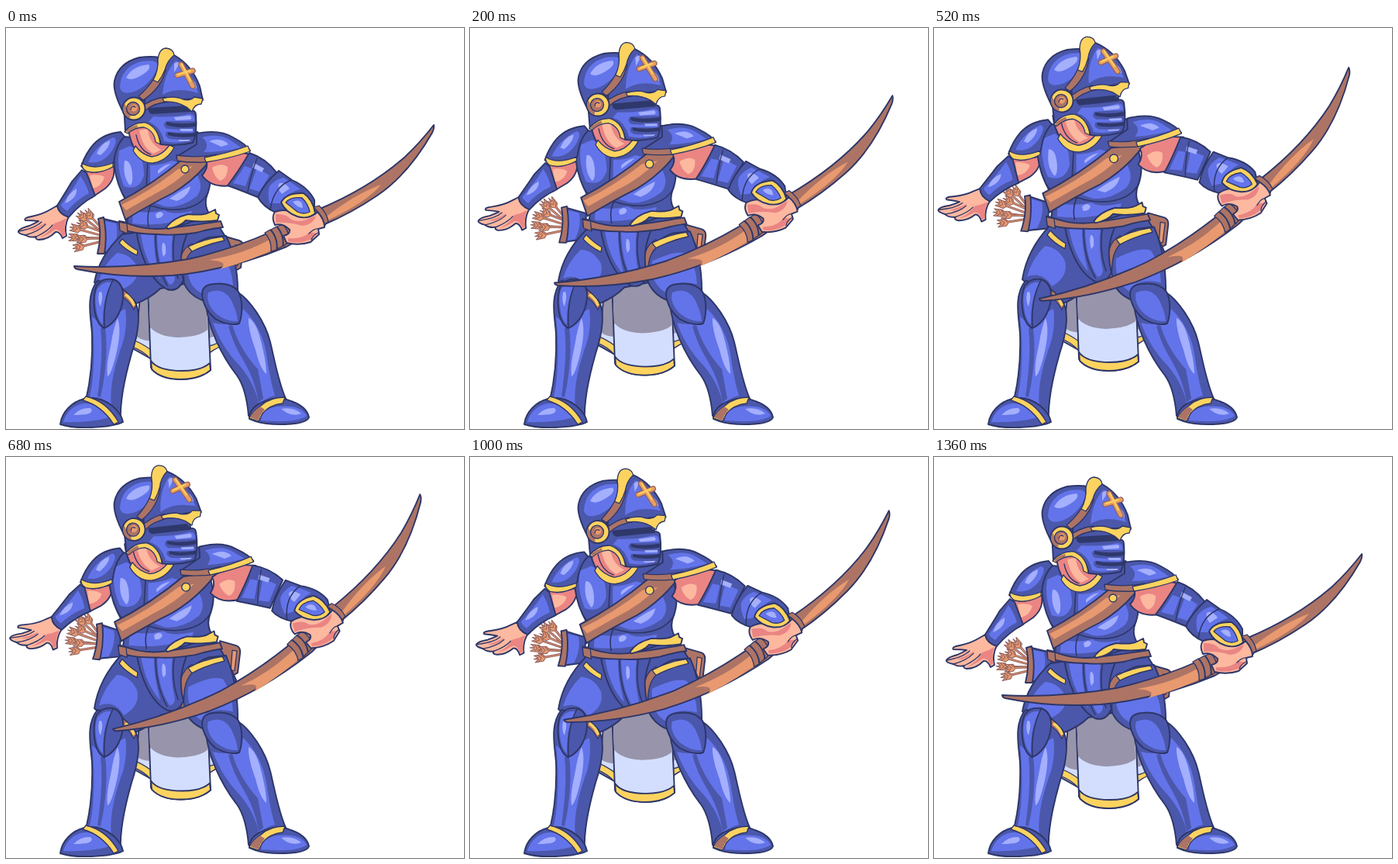
Write an HTML page that moves like this. It is 591x517 px and loops after 1400 ms.

```html
<!DOCTYPE html>
<html lang="en">
<head>
<meta charset="utf-8">
<title>Knight with bow</title>
<style>
  html, body { margin: 0; width: 100%; height: 100%; overflow: hidden; background: #fff }
  svg { display: block; width: 591px; height: 517px }
  path, circle { stroke-linejoin: round; stroke-linecap: round }
  .o { stroke: #2d3667; stroke-width: 1.9 }
  .d { fill: #4b57aa }
  .b { fill: #6374ea }
  .h { fill: #a4affd }
  .k { fill: #2f386b }
  .g { fill: #fdd35f }
  .n { fill: #ad7465 }
  .c { fill: #e8996f }
  .s { fill: #fdb8a0 }
  .p { fill: #ea8583 }
  .w { fill: #d3deff }
  .a { fill: #9794ab }
  .l { fill: none; stroke: #2d3667; stroke-width: 1.5 }
  .thin { stroke-width: 1.3 }
</style>
</head>
<body>
<svg viewBox="0 0 591 517">
  <g data-part="cloth">
    <path class="a o" d="M174 335L168 400Q166 407 163 413L188 427V340Z"/>
    <path class="w" d="M169 398Q177 404 187 403V417L167 407Z"/>
    <path class="g o thin" d="M166 403Q176 407 187 415V427Q177 416 163 411Z"/>
    <path class="a o" d="M258 340L274 398L278 408L262 419Z"/>
    <path class="w" d="M262 400L272 396L275 405L262 411Z"/>
    <path class="g o thin" d="M262 410Q271 408 276 404L278 410Q269 414 262 419Z"/>
    <path class="w o" d="M183 330L187 438Q200 453 226 453Q250 453 264 441L259 330Z"/>
    <path class="a" d="M184 330L186 386Q197 398 222 399Q250 398 260 389L258 330Z"/>
    <path class="g o" d="M187 429Q196 442 227 442Q252 442 263 432L264 441Q250 453 226 453Q200 453 188 440Z"/>
  </g>

  <g data-part="pouch">
    <path class="n o" d="M280 268L301 274Q307 276 306 284L303 309L296 313L284 309Z"/>
    <path class="c o thin" d="M296 280L302 281L299 306L294 307Z"/>
  </g>

  <g data-part="quiver">
    <g id="arrows"></g>
    <path class="d o" d="M126 246L151 252L152 285L125 290Z"/>
    <path class="b" d="M128 249L142 252Q146 270 138 286L128 288Z"/>
    <path class="n o" d="M119 246L126 244Q131 268 127 291L118 291Q124 268 119 246Z"/>
  </g>

  <g data-part="hips">
    <path class="d o" d="M155 245L270 248L285 272L298 300L150 300Z"/>
  </g>

  <g data-part="thighs">
    <path class="d o" d="M150 266C135 280 119 300 114 328L140 350L166 356Q187 348 199 336L230 330L195 260Z"/>
    <path class="b" d="M143 290Q126 305 120 325Q140 318 152 336Q174 325 169 307Q160 291 143 290Z"/>
    <path class="g o thin" d="M150 272Q160 282 170 287L169 293Q154 286 146 277Z"/>
    <path class="d o" d="M228 325C226 300 230 280 262 270L284 268C292 285 300 310 299 345L256 352Q235 345 228 325Z"/>
    <path class="b" d="M235 304Q266 290 280 295Q292 310 293 332Q270 327 258 335L254 343Q232 332 235 304Z"/>
    <path class="n o thin" d="M226 328C220 302 226 284 240 278L245 284C232 292 228 306 230 329Z"/>
    <path class="g o thin" d="M235 282Q255 272 279 269L282 274Q258 279 240 288Z"/>
  </g>

  <g data-part="hips">
    <path class="d o" d="M168 260C172 290 185 325 208 337Q222 341 229 325C222 300 227 280 236 260Z"/>
    <path class="b" d="M174 266Q179 302 199 324Q190 292 191 266Z"/>
    <path class="b" d="M195 266Q195 306 211 331Q217 330 218 323Q211 295 215 266Z"/>
    <path class="h" d="M202 277Q207 276 206 291L203 295Q200 287 202 277Z"/>
    <path class="l" d="M193 264Q192 304 208 332M218 264Q212 295 222 323"/>
  </g>

  <g id="legs">
    <path class="d o" d="M118 326C102 345 110 375 111 395C112 425 109 455 103 480L148 506C147 485 152 455 162 420C172 390 174 365 166 352L146 332Z"/>
    <path class="b" d="M111 372C115 410 114 450 108 476Q124 474 136 489C133 462 141 432 151 405Q157 383 154 362L143 368L128 386Z"/>
    <path class="d" d="M122 387Q126 420 118 475L122 476Q133 425 128 387Z"/>
    <path class="h" d="M144 374Q150 390 141 425Q135 448 131 449Q129 435 135 410Q139 385 144 374Z"/>
    <path class="n o thin" d="M148 336Q162 343 168 358L165 363Q158 350 149 346Z"/>
    <path class="g" d="M155 342Q164 348 167 357L164 359Q160 349 153 345Z"/>
    <path class="d o" d="M117 332Q125 322 138 324Q149 327 151 341C152 360 143 380 127 387Q117 383 114 362Q112 343 117 332Z"/>
    <path class="b" d="M118 336Q126 326 136 328Q124 350 125 382Q118 377 116 360Q114 345 118 336Z"/>
    <path class="h" d="M120 341Q125 337 124 350L122 359Q118 353 120 341Z"/>
    <path class="l" d="M138 325Q125 350 127 386"/>
    <path class="d o" d="M70 511C72 495 85 482 101 478Q120 474 137 487Q149 497 151 508Q140 514 110 515Q85 516 70 511Z"/>
    <path class="b" d="M74 508C77 495 90 484 103 484Q122 485 134 502Q110 509 74 508Z"/>
    <path class="h" d="M87 499Q96 489 109 490Q114 495 104 498Q95 499 87 499Z"/>
    <path class="g o thin" d="M103 475Q130 481 145 508L139 511Q124 487 99 480Z"/>

    <path class="d o" d="M257 345C258 385 280 425 298 448Q310 465 313 500L362 480C352 460 346 425 341 405C335 380 315 350 298 340Z"/>
    <path class="b" d="M267 380Q300 388 306 362Q330 385 336 420Q341 455 347 474Q335 477 326 485Q322 460 302 436Q278 411 267 380Z"/>
    <path class="d" d="M292 383Q302 415 325 440L332 478L326 483Q322 455 306 428Q292 405 287 384Z"/>
    <path class="h" d="M313 374Q322 378 328 400Q336 430 336 446Q328 440 322 415Q312 388 313 374Z"/>
    <path class="d o" d="M253 345Q252 331 268 330Q290 327 300 340C306 352 305 370 301 381Q288 385 270 375Q255 362 253 345Z"/>
    <path class="b" d="M261 341Q280 333 290 350Q298 365 299 378Q285 379 272 369Q257 355 261 341Z"/>
    <path class="d o" d="M314 499Q318 487 332 482Q352 474 368 481Q388 488 391 502Q388 510 360 511Q330 512 314 504Z"/>
    <path class="b" d="M329 506Q330 491 350 488Q380 485 388 500Q375 510 329 506Z"/>
    <path class="h" d="M355 491Q370 488 381 497Q372 501 362 496Z"/>
    <path class="g o thin" d="M329 487Q340 476 360 476L357 484Q340 486 331 497L326 507L314 503Q318 494 329 487Z"/>
    <path class="n" d="M328 488L334 492Q328 498 326 506L315 502Q319 494 328 488Z"/>
  </g>

  <g data-part="armL">
    <path class="p o" d="M104 178Q120 188 139 178Q142 195 128 207L110 219L98 195Z"/>
    <path class="s" d="M108 190Q120 188 127 192Q124 204 112 207Z"/>
    <path class="s o" d="M66 229L81 243Q75 255 78 268L73 271Q69 262 64 263Q54 273 42 273Q37 272 39 269Q31 271 25 267Q15 265 16 262Q18 258 30 255Q37 252 42 249Q34 248 25 248Q22 245 33 243Q48 240 59 233Z"/>
    <path class="p" d="M78 245Q74 256 77 266L73 269Q70 259 63 260Q52 268 44 270Q58 262 62 252Q70 250 78 245ZM30 261Q42 257 52 250Q46 258 36 261Z"/>
    <path class="l thin" d="M25 267Q43 262 51 253M39 269Q54 262 60 254M17 262Q38 258 46 250"/>
    <path class="d o" d="M98 183L104 187L115 216Q95 227 81 244Q68 240 66 229Q78 210 85 198Z"/>
    <path class="b" d="M96 191Q104 202 107 213Q90 222 79 236Q72 232 71 228Q84 212 96 191Z"/>
    <path class="h" d="M76 226Q80 213 91 207Q92 215 85 221Q80 225 76 226Z"/>
  </g>

  <g data-part="torso">
    <path class="d o" d="M152 140Q140 150 139 168Q140 192 149 211Q160 230 156 254Q185 266 215 258L264 242Q254 229 260 214Q267 196 261 175Q264 150 247 134L200 145Z"/>
    <path class="b" d="M146 158Q142 180 152 204Q172 211 178 190Q178 160 160 152Z"/>
    <path class="h" d="M153 171Q161 170 163 188Q164 201 160 203Q150 192 153 171Z"/>
    <path class="b" d="M186 177Q200 177 214 171L222 173L186 201Z"/>
    <path class="h" d="M196 184Q202 177 213 175L196 188Z"/>
    <path class="b" d="M191 225Q225 208 246 188Q256 205 246 217Q225 233 205 230Z"/>
    <path class="h" d="M211 220Q225 210 238 204Q236 217 220 223Z"/>
    <path class="b" d="M164 236Q185 240 204 235Q215 242 240 236L238 244Q200 257 163 252Z"/>
    <path class="h" d="M193 240Q200 234 203 240Q201 246 194 245Z"/>
    <path class="l" d="M183 170L181 206M150 213Q165 236 187 229Q220 240 245 228Q256 222 261 212M187 229Q181 240 184 256"/>
    <path class="p o" d="M158 130Q162 165 188 170Q208 167 214 152L195 120Z"/>
    <path class="s" d="M172 132Q176 154 190 162L200 157Q184 148 183 130Z"/>
    <path class="l thin" d="M168 138Q172 158 187 163"/>
    <path class="g o thin" d="M164 158Q174 175 190 174Q208 171 217 154L211 151Q201 165 188 166Q175 163 167 152Z"/>
    <path class="n o" d="M146 224Q190 201 228 169L268 164Q247 194 215 213Q185 228 154 247Z"/>
    <path class="c" d="M149 228Q185 211 222 182L241 178Q220 200 190 215L155 235Z"/>
    <circle class="g o thin" cx="231" cy="182" r="5"/>
  </g>

  <g data-part="belt">
    <path class="n o" d="M146 249L152 250Q180 262 210 258Q245 254 277 249L280 257Q262 259 245 264Q215 268 196 266Q166 266 147 259Z"/>
    <path class="n o thin" d="M146 250L156 252L157 265L147 261Z"/>
    <path class="g o" d="M207 257Q215 245 235 240Q255 242 262 238L270 234L271 239L275 241L273 248Q250 251 232 248Q225 256 209 259Z"/>
  </g>

  <g data-part="padL">
    <path class="d o" d="M97 178Q103 161 113 150Q126 136 148 134L153 140Q142 150 139 173Q130 186 112 186Q102 184 97 178Z"/>
    <path class="b" d="M106 173Q116 151 138 141Q146 142 137 158Q125 176 106 173Z"/>
    <path class="h" d="M117 162Q122 149 134 145Q135 153 122 164Z"/>
    <path class="g o thin" d="M98 174Q112 184 138 174L138 179Q120 189 104 185Q97 181 98 174Z"/>
  </g>

  <g data-part="upperR">
    <path class="p o" d="M266 166L300 160L316 163L291 203Q265 207 253 190Q262 180 258 170Z"/>
    <path class="s" d="M266 180Q278 173 286 179Q286 194 276 197Q268 191 266 180Z"/>
  </g>
  <g data-part="guardR">
    <path class="d o" d="M314 161Q335 168 349 186L327 219Q305 210 286 203Q300 185 314 161Z"/>
    <path class="b" d="M308 178L317 181Q313 193 309 204L293 200Z"/>
    <path class="b" d="M324 180L340 190L327 211L314 207Z"/>
    <path class="h" d="M320 174L333 181L330 186L318 180Z"/>
    <path class="l thin" d="M324 168Q316 188 312 211"/>
  </g>
  <g data-part="foreR">
    <path class="d o" d="M325 218Q333 200 352 184L369 196Q390 205 398 222V240Q375 250 348 238Q331 230 325 218Z"/>
    <path class="b" d="M340 204Q346 196 358 193Q370 200 380 208Q362 212 356 226L340 226Q337 213 340 204Z"/>
    <path class="h" d="M352 201Q358 197 366 207L356 214Q350 208 352 201Z"/>
    <path class="l" d="M368 196Q345 205 341 234"/>
  </g>
  <g data-part="padR">
    <path class="d o" d="M246 136Q275 130 293 141Q310 150 315 158Q300 163 270 170Q240 174 220 166L246 150Z"/>
    <path class="b" d="M253 141Q275 135 290 145L303 154Q280 160 255 160Q264 150 253 141Z"/>
    <path class="h" d="M262 146Q278 140 287 150L278 153Z"/>
    <path class="n o thin" d="M220 164Q245 168 272 163L258 173Q235 174 221 171Z"/>
    <path class="g o thin" d="M256 167Q285 162 312 152L315 159Q290 168 258 173Z"/>
  </g>

  <g data-part="skull">
    <path class="d o" d="M153 112Q137 82 140 68Q145 45 172 38Q188 36 198 38L215 80L182 105L165 112Z"/>
    <path class="b" d="M147 77Q148 50 175 43Q195 40 196 48Q190 70 168 81Q150 88 147 77Z"/>
    <path class="h" d="M155 64Q163 49 184 47Q189 53 173 62Q161 69 155 64Z"/>
  </g>

  <g data-part="jaw">
    <path class="d o" d="M152 100L180 92L238 88V106Q245 106 245 112Q247 135 241 148Q220 153 200 150Q195 128 178 123Q160 124 154 134Z"/>
    <path class="b" d="M190 114Q215 116 236 111Q245 111 243 120L207 120Q200 125 208 130L242 132L241 135L207 134Q203 139 211 143L238 145Q220 150 204 146Q199 126 184 121Z"/>
    <path class="h" d="M217 115L237 113Q241 115 238 118L219 119ZM224 130H241V133H226ZM222 144H238L236 146H224Z"/>
    <path class="k" d="M184 103L234 100L239 108L188 111Q182 108 184 103Z"/>
    <path class="k" d="M207 121Q224 125 245 122V127Q222 130 207 125ZM209 134Q224 138 244 135L243 140Q222 142 209 138Z"/>
    <path class="g o thin" d="M153 134Q164 121 180 122Q197 128 199 150L193 147Q191 132 178 128Q166 128 157 136Z"/>
    <path class="n" d="M155 133Q161 127 169 125L170 128Q163 130 157 135Z"/>
  </g>

  <g data-part="head">
    <path class="d o" d="M196 40Q205 26 217 35Q240 48 250 75L254 93Q235 90 215 94Q195 96 180 101Q176 92 185 80Q198 65 196 40Z"/>
    <path class="b" d="M202 86Q204 58 219 42Q238 52 248 84Q220 75 202 86Z"/>
    <path class="h" d="M217 46Q223 42 224 46L217 57ZM240 66Q246 71 246 78L240 75Z"/>
    <path class="n o thin" d="M197 46Q196 66 171 88L177 93Q200 78 206 54Z"/>
    <path class="g o thin" d="M196 40Q198 26 207 26Q216 27 217 35Q208 42 205 54Q202 62 196 70L190 67Q197 54 196 40Z"/>
    <path class="n o thin" d="M174 102Q188 91 206 89L212 95Q192 96 180 106Z"/>
    <path class="g o thin" d="M202 91Q212 88 223 90Q236 96 243 89L254 91L252 98Q243 98 240 108L233 102Q220 94 204 95Z"/>
    <path fill="none" stroke="#8f5f5d" stroke-width="7.5" d="M226 47L241 75M221 61L241 55"/>
    <path fill="none" stroke="#e8a05f" stroke-width="5" d="M226 47L241 75M221 61L241 55"/>
    <path fill="none" stroke="#fdd35f" stroke-width="2" d="M227 47L238 68M222 60L238 55"/>
    <circle class="g o" cx="165" cy="104" r="14.5"/>
    <path class="n" d="M153 97Q147 109 160 117L161 110L156 104Z"/>
    <circle class="n o thin" cx="164" cy="104" r="8.5"/>
    <circle class="c" cx="165" cy="103" r="4.5"/>
    <path class="l thin" d="M161 105Q162 99 167 102"/>
  </g>

  <g data-part="bow">
    <path class="n o" d="M403 234Q470 206 515 166Q535 147 552 125Q553 129 550 135Q519 189 479 216Q445 239 409 254Z"/>
    <path class="c" d="M411 245Q450 214 484 202Q466 224 415 248Z"/>
    <path class="n o" d="M344 262Q290 286 235 298Q160 311 88 307Q88 310 92 311Q150 323 215 319Q290 312 362 282L412 254L403 234Z"/>
    <path class="c" d="M347 269Q310 291 262 299Q290 301 276 311Q320 299 356 280Z"/>
    <path class="n o thin" d="M334 264L341 260Q351 271 349 286L342 288Q343 274 334 264ZM342 260L349 256Q359 267 357 281L350 285Q351 271 342 260ZM350 256L357 253Q367 263 364 277L358 281Q359 267 350 256Z"/>
    <path class="n o thin" d="M397 231L404 229Q414 238 416 250L409 254Q407 240 397 231Z"/>
    <path class="s o" d="M347 237Q365 231 378 243Q395 245 402 237Q411 247 411 257L403 259L404 266L393 276Q378 281 362 277L358 268Q367 266 366 260Q357 251 347 254Q342 244 347 237Z"/>
    <path class="p" d="M348 240Q362 239 368 247Q380 252 392 245L400 242Q396 254 382 255Q365 250 348 251ZM364 271Q382 273 392 263L402 265L392 273Q378 279 364 275Z"/>
    <path class="l thin" d="M391 265Q398 258 403 259M394 273Q396 267 403 264"/>
    <path class="g o" d="M355 225Q361 212 384 213Q396 221 399 239Q390 247 376 243Q361 238 355 225Z"/>
    <path class="b o thin" d="M361 225Q367 217 382 219Q390 227 392 237Q384 241 376 237Z"/>
    <path class="h" d="M370 224Q378 220 382 226L383 232Q375 231 370 224Z"/>
  </g>
</svg>
<script>
  // part: [rotation, pivot x, pivot y, shift x, shift y, stretch x, stretch y] at full breath
  const rig = {
    cloth: [0, 0, 0, 0, -11.5],
    pouch: [0, 0, 0, -4, -31],
    quiver: [5, 125, 268, -4, -30],
    hips: [0, 0, 0, 0, -10.5],
    thighs: [0, 200, 360, 0, 0, 0, .13],
    torso: [0, 200, 200, -1.4, -13, .083, .07],
    belt: [-1.5, 210, 255, -1, -8],
    padL: [0, 0, 0, -1, -16.5],
    padR: [-3, 268, 150, 4, -21.5],
    armL: [6.8, 97, 183, -2, -19],
    upperR: [-8, 270, 185, 10, -17],
    guardR: [-9.5, 318, 192, 9.5, -22.5],
    foreR: [-14.5, 355, 213, 16, -27],
    skull: [0, 0, 0, 0, -10.5],
    jaw: [-3, 165, 104, 0, -10.5],
    head: [-7.3, 165, 104, 0, -10.5],
    bow: [-16, 378, 255, 24.7, -34.2]
  };
  const parts = [...document.querySelectorAll('[data-part]')];

  const arrow = (x, y, turn) => `<g transform="translate(${x} ${y}) rotate(${turn})">
    <path class="c o" style="stroke:#8f5f5d;stroke-width:1" d="M0-1L-5-4.5H6L9-1H38V1H9L6 4.5H-5L0 1L-6 0Z"/>
    <path class="l" style="stroke:#8f5f5d;stroke-width:1" d="M0-4L4 0L0 4M4-4L8 0"/></g>`;
  document.getElementById('arrows').innerHTML = [
    [106, 239, 48], [97, 242, 38], [97, 253, 20], [88, 258, 15], [86, 270, 2], [96, 272, -3], [92, 283, -14]
  ].map(a => arrow(...a)).join('');

  function pose(p) {
    for (const el of parts) {
      const [turn, x, y, dx, dy, sx = 0, sy = 0] = rig[el.dataset.part];
      el.setAttribute('transform', `translate(${x + dx * p} ${y + dy * p}) rotate(${turn * p})
        scale(${1 + sx * p} ${1 + sy * p}) translate(${-x} ${-y})`);
    }
  }

  const LOOP = 1400, STEP = 40, PEAK = 640, END = 1360;
  function frame(now) {
    const t = Math.floor(now % LOOP / STEP) * STEP;
    const u = t < PEAK ? t / PEAK : (END - t) / (END - PEAK);
    pose(t < PEAK ? Math.sin(u * Math.PI / 2) : Math.cos((1 - u) * Math.PI / 2));
    requestAnimationFrame(frame);
  }
  frame(performance.now());
</script>
</body>
</html>
```
